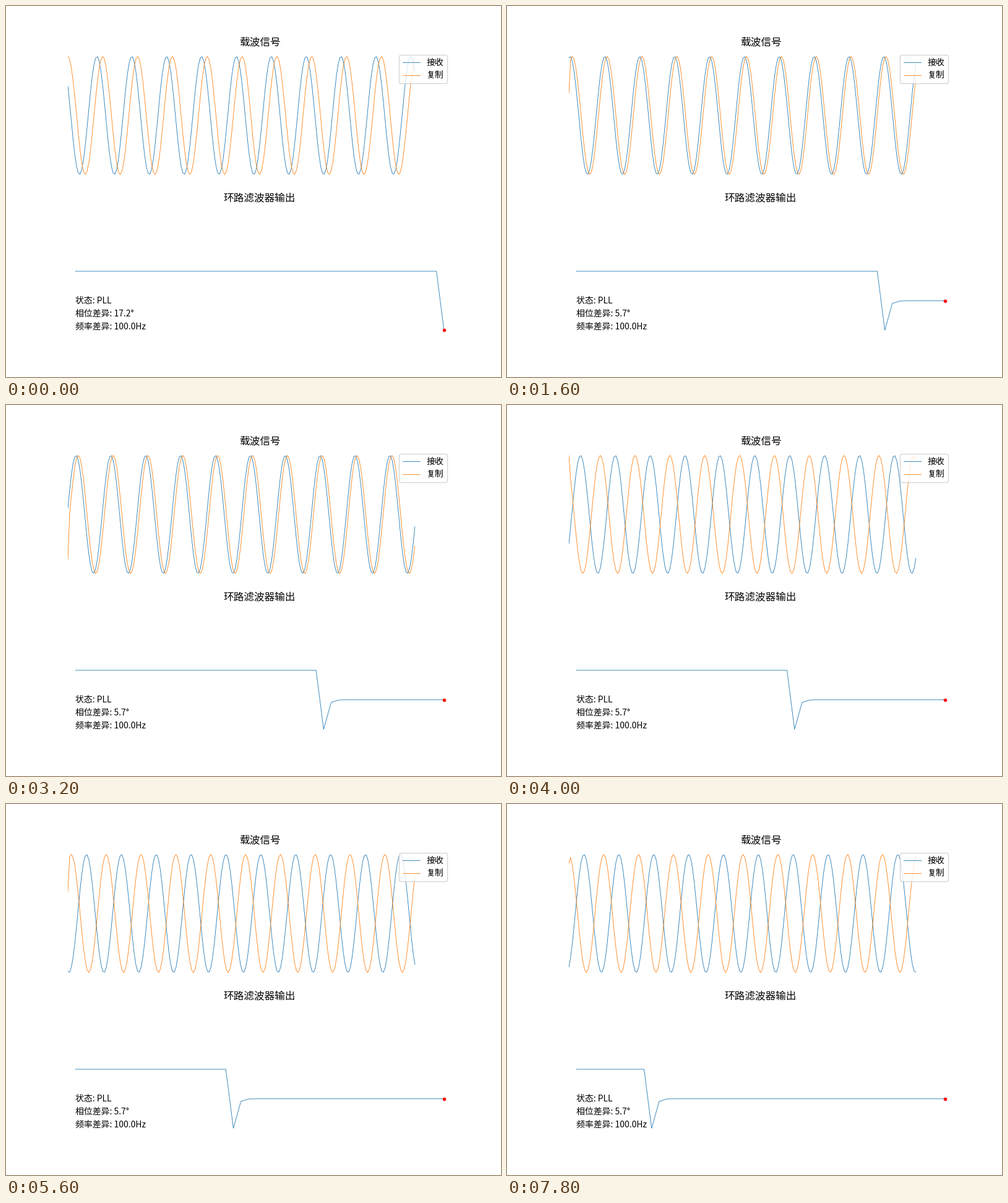
A matplotlib script for the animation above (8 s loop, 800 by 600 pixels).

```python
import numpy as np
import matplotlib.pyplot as plt
from matplotlib.animation import FuncAnimation

plt.rcParams["font.family"] = ["Noto Sans CJK JP"]

FRAMES, INTERVAL = 40, 200
SAMPLES = 200          # samples shown per epoch
STEP = 18.0            # carrier phase per sample, degrees
DOPPLER = 36.0         # phase gained per epoch, degrees
DRIFT = 3.6            # replica phase gained within an epoch, degrees
BIT_EPOCHS = 20        # the data bit flips the carrier after this many epochs
SETTLE = 0.09          # loop error ratio between epochs
HISTORY = 50

n = np.arange(SAMPLES)


def wave(degrees):
    return np.cos(np.radians(degrees))


def carrier_phase(k):
    return 60 + DOPPLER * k


def replica_phase(k):
    return carrier_phase(k) - 24 - 36 * SETTLE ** k


def received(k):
    flip = -1 if (k // BIT_EPOCHS) % 2 else 1
    return flip * wave(carrier_phase(k) + STEP * n)


def replica(k):
    phase = replica_phase(k) + (STEP + DRIFT / SAMPLES) * n
    if k:
        # the phase correction only acts from the second sample on
        phase[0] = replica_phase(k - 1) + DRIFT
    return wave(phase)


def loop_output(k):
    age = np.arange(k - HISTORY + 1, k + 1)
    settled = -0.5 - 0.5 * SETTLE ** np.maximum(age, 0)
    return np.where(age < 0, 0.0, settled)


fig, (top, low) = plt.subplots(2, 1, figsize=(8, 6), dpi=100)
fig.subplots_adjust(left=0.125, right=0.9, bottom=0.11, top=0.88, hspace=0.2)
for ax, title, span in ((top, "载波信号", 1.1 * SAMPLES),
                        (low, "环路滤波器输出", HISTORY + 1)):
    ax.set(xlim=(0, span), ylim=(-1.1, 1.1))
    ax.set_title(title, fontsize=12)
    ax.axis("off")

rx_line, = top.plot(n, received(0), lw=0.6, color="C0", label="接收")
rep_line, = top.plot(n, replica(0), lw=0.6, color="C1", label="复制")
top.legend(loc="upper right", fontsize=10)

epochs = np.arange(1, HISTORY + 1)
out_line, = low.plot(epochs, loop_output(0), lw=0.6, color="C0")
dot, = low.plot([HISTORY], [-1], "r.", ms=6)


def note(y, text=""):
    return fig.text(112.2 / 800, 1 - y / 600, text, fontsize=10, va="baseline")


note(481, "状态: PLL")
phase_note = note(502)
note(523, "频率差异: 100.0Hz")


def update(k):
    rx_line.set_ydata(received(k))
    rep_line.set_ydata(replica(k))
    out = loop_output(k)
    out_line.set_ydata(out)
    dot.set_ydata([out[-1]])
    error = 0.3 if k == 0 else 0.1
    phase_note.set_text(f"相位差异: {np.degrees(error):.1f}°")
    return rx_line, rep_line, out_line, dot, phase_note


anim = FuncAnimation(fig, update, frames=FRAMES, interval=INTERVAL,
                     repeat=True, repeat_delay=0, blit=False)
plt.show()
```
